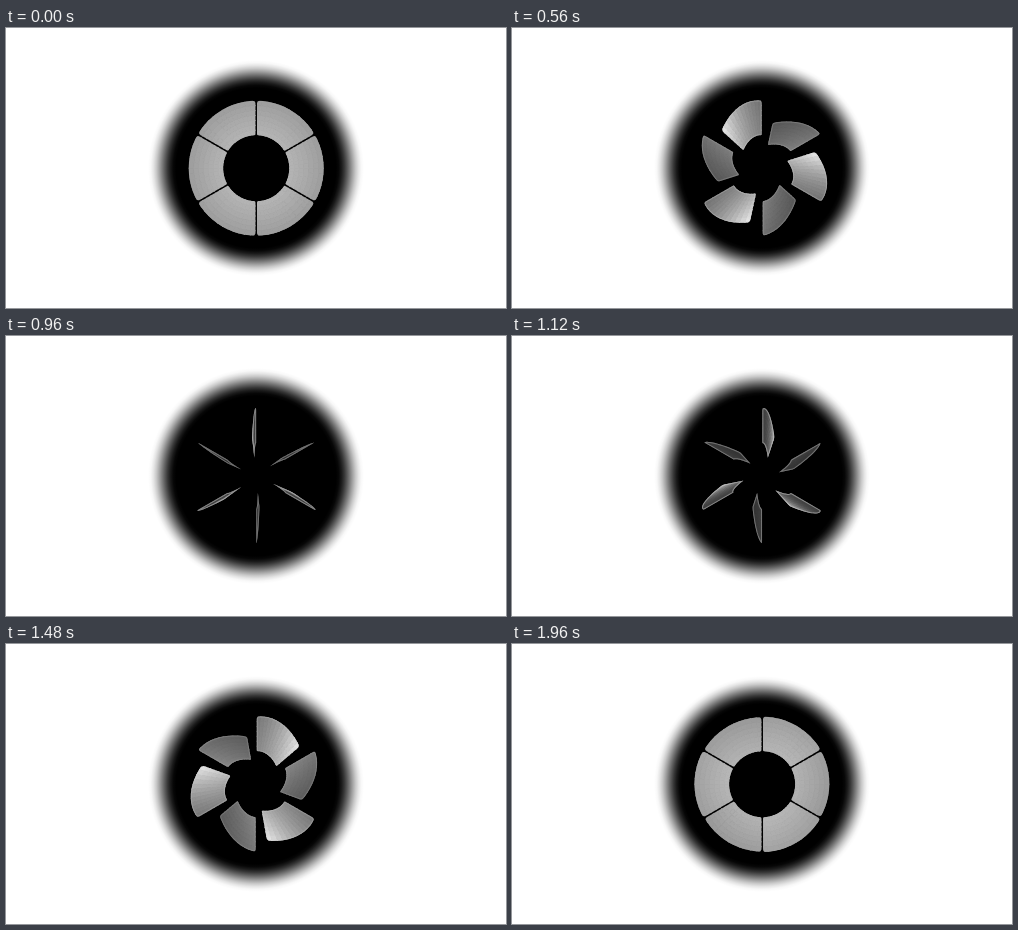
An HTML page with a canvas for the animation above (2000 ms loop, 500 by 280 pixels).

```html
<!DOCTYPE html>
<html lang="en">
<head>
<meta charset="utf-8">
<title>Turning ring</title>
<style>
  html, body { margin: 0; width: 100%; height: 100%; overflow: hidden; background: #fff; }
  canvas { display: block; }
</style>
</head>
<body>
<canvas id="stage" width="500" height="280"></canvas>
<script>
const ctx = document.getElementById('stage').getContext('2d');
const LOOP = 2000, STEP = 40;
const CX = 250.2, CY = 140.2;
const OUTER = 67.5, INNER = 33, GAP = 0.8;
const EYE = 500, LIGHT = 130;
const SPAN = Math.PI / 3;

const backdrop = ctx.createRadialGradient(250, 140, 80, 250, 140, 108);
for (let i = 0; i <= 10; i++) {
  const u = i / 10;
  backdrop.addColorStop(u, `rgba(0,0,0,${1 - u * u * (3 - 2 * u)})`);
}

// Flat blade coordinates: the hinge points up, the blade lies to its left.
const polar = (r, a) => [r * Math.sin(a), -r * Math.cos(a)];
const hingeSide = r => polar(r, -Math.asin(GAP / r));
const freeSide = r => polar(r, -SPAN + Math.asin(GAP / r));

function bend(list, a, corner, b) {
  for (let i = 0; i <= 5; i++) {
    const t = i / 5, s = 1 - t;
    list.push([0, 1].map(n => s * s * a[n] + 2 * s * t * corner[n] + t * t * b[n]));
  }
}

function arc(list, r, from, to) {
  for (let i = 0; i <= 20; i++) list.push(polar(r, from + (to - from) * i / 20));
}

function bladeOutline() {
  const pts = [], big = 3, small = 1.5;
  const oTrim = (GAP + big) / OUTER, iTrim = (GAP + small) / INNER;
  bend(pts, freeSide(OUTER - big), freeSide(OUTER), polar(OUTER, oTrim - SPAN));
  arc(pts, OUTER, oTrim - SPAN, -oTrim);
  bend(pts, polar(OUTER, -oTrim), hingeSide(OUTER), hingeSide(OUTER - big));
  bend(pts, hingeSide(INNER + small), hingeSide(INNER), polar(INNER, -iTrim));
  arc(pts, INNER, -iTrim, iTrim - SPAN);
  bend(pts, polar(INNER, iTrim - SPAN), freeSide(INNER), freeSide(INNER + small));
  return pts;
}
const outline = bladeOutline();

function turn([x, y], angle, side) {
  return [x * Math.cos(angle), y, -x * Math.sin(angle) * side];
}

function trace(points, angle, side) {
  ctx.beginPath();
  for (const p of points) {
    const [x, y, z] = turn(p, angle, side);
    const k = EYE / (EYE - z);
    ctx.lineTo(x * k, y * k);
  }
  ctx.closePath();
}

// Point light in front of the hub, plus a sheen on parts close to the viewer.
function shade(point, angle, side) {
  const [x, y, z] = turn(point, angle, side);
  const dist2 = x * x + y * y + (LIGHT - z) ** 2;
  const lit = Math.abs(Math.cos(angle)) * (LIGHT * LIGHT + 2500) / dist2;
  const sheen = 60 * Math.max(0, z / 55) ** 3;
  return Math.min(245, Math.round(38 + 132 * lit + sheen));
}

function drawBlade(angle, side) {
  const rows = 7, cols = 12;
  const dr = (OUTER - INNER) / rows, da = SPAN / cols;
  ctx.save();
  trace(outline, angle, side);
  ctx.clip();
  for (let i = 0; i < rows; i++) {
    for (let j = 0; j < cols; j++) {
      const r = INNER + i * dr, a = -SPAN + j * da;
      const v = shade(polar(r + dr / 2, a + da / 2), angle, side);
      ctx.fillStyle = ctx.strokeStyle = `rgb(${v},${v},${v})`;
      ctx.lineWidth = 1;
      trace([polar(r, a), polar(r + dr, a), polar(r + dr, a + da), polar(r, a + da)], angle, side);
      ctx.fill();
      ctx.stroke();
    }
  }
  const rim = side > 0 ? 215 : 180;
  ctx.strokeStyle = `rgba(${rim},${rim},${rim},${0.5 * Math.sin(angle) ** 2})`;
  ctx.lineWidth = 2;
  trace(outline, angle, side);
  ctx.stroke();
  ctx.restore();
}

function draw(time) {
  const t = Math.floor((time % LOOP) / STEP) * STEP;
  const angle = Math.PI * t / LOOP;
  ctx.fillStyle = '#fff';
  ctx.fillRect(0, 0, 500, 280);
  ctx.fillStyle = backdrop;
  ctx.fillRect(0, 0, 500, 280);
  for (let k = 0; k < 6; k++) {
    ctx.save();
    ctx.translate(CX, CY);
    ctx.rotate(k * SPAN);
    drawBlade(angle, k % 2 ? -1 : 1);
    ctx.restore();
  }
}

const start = performance.now();
function tick() {
  draw(performance.now() - start);
  requestAnimationFrame(tick);
}
tick();
</script>
</body>
</html>
```
